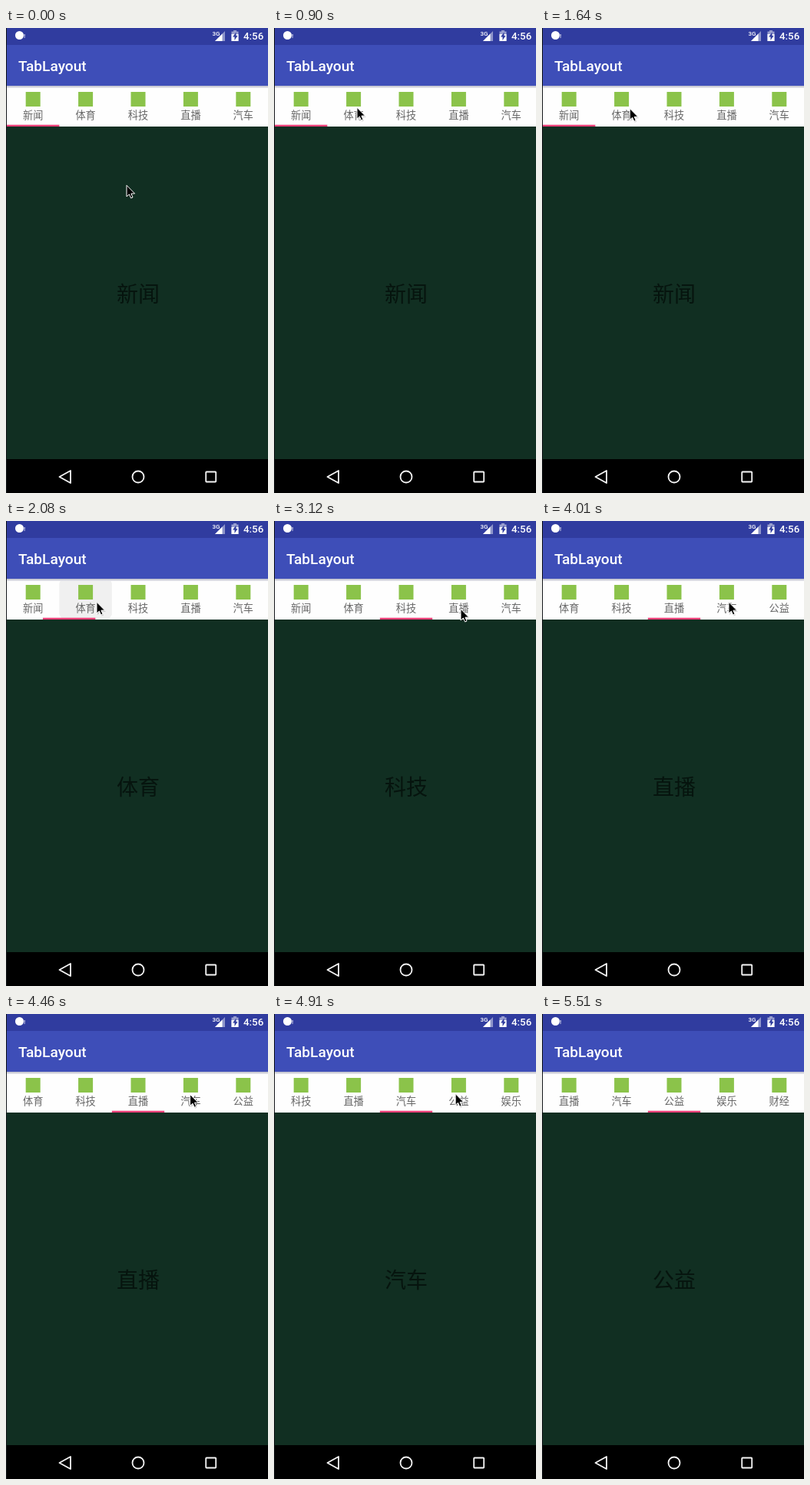
Animation of 341 by 604 pixels, one loop 6.26 s. Source, as an HTML page:

```html
<!DOCTYPE html>
<html lang="zh">
<head>
<meta charset="utf-8">
<style>
html, body { margin: 0; height: 100%; overflow: hidden; background: #000; }
svg { display: block; width: 100vw; height: 100vh; }
text { font-family: Roboto, sans-serif; font-weight: 500; fill: #fff; }
.cjk text { font-family: "Noto Sans CJK SC", "Noto Sans CJK", sans-serif; font-weight: 400; text-anchor: middle; }
#tabs text { font-size: 13.2px; fill: #666; }
#pages text { font-size: 28px; fill: #06140e; }
</style>
</head>
<body>
<svg viewBox="0 0 341 604">
  <defs>
    <linearGradient id="shade" x2="0" y2="1">
      <stop stop-color="#b8bac8"/><stop offset="1" stop-color="#ececef"/>
    </linearGradient>
    <clipPath id="cell"><rect x="-34.2" y="75" width="68.4" height="53"/></clipPath>
  </defs>

  <rect y="75" width="341" height="53" fill="#fefefe"/>
  <g id="tabs" class="cjk"></g>
  <rect id="bar" y="125.7" width="68.4" height="2.3" fill="#ee4079"/>

  <rect y="128" width="341" height="432" fill="#112f22"/>
  <g id="pages" class="cjk"></g>

  <rect width="341" height="22" fill="#303c9f"/>
  <rect y="22" width="341" height="53" fill="#3e4eb8"/>
  <rect y="75" width="341" height="3" fill="url(#shade)"/>
  <text x="16" y="56" font-size="19.1">TabLayout</text>

  <circle cx="17.5" cy="9.5" r="5.5" fill="#fff"/>
  <text x="23" y="13" font-size="8">!</text>
  <text x="268.5" y="10" font-size="8">3G</text>
  <path d="M285 4V17H272Z" fill="#fff" opacity=".45"/>
  <path d="M281.5 7.5V17H272Z" fill="#fff"/>
  <path d="M296 3h4v1.5h2.500V17h-9V4.500H296Z" fill="#fff" opacity=".5"/>
  <path d="M293.500 8h9v9h-9Z" fill="#fff"/>
  <path d="M299.500 5.500l-4.500 6h2.500V16l4-6h-2Z" fill="#303c9f"/>
  <text x="309" y="15" font-size="13.3">4:56</text>

  <rect y="560" width="341" height="44"/>
  <g fill="none" stroke="#f4f4f4" stroke-width="1.8" stroke-linejoin="round">
    <path d="M69.500 583L84 575V591Z"/>
    <circle cx="172" cy="583" r="7.500"/>
    <rect x="260.200" y="576.500" width="13" height="13" rx=".8"/>
  </g>
  <rect width="1" height="604" fill="#15181b"/>

  <g id="cursor">
    <path d="M1 2V17L4.500 14 6.500 18.500 9 17.500 7 13H12Z" opacity=".15"/>
    <path d="M0 .3V15L3.400 12 5.600 17 8 16 5.900 11.100H10.600Z" stroke="#fff"/>
  </g>
</svg>
<script>
const LOOP = 6260, STEP = 148.5, TAB = 68.4, WIDTH = 341;
const names = ['新闻', '体育', '科技', '直播', '汽车', '公益', '娱乐', '财经'];
const $ = id => document.getElementById(id);

// Times are counted in screen refreshes of STEP ms; each tap moves one tab on.
const taps = [13.68, 18.61, 24.5, 30.5, 34.31];
const cursorPath = [
  [0, 157, 204], [6, 108, 103], [14, 118, 105], [18, 164, 112],
  [21, 243, 114], [27, 243, 105], [34, 235, 103], [36.5, 248, 640]
];

const clamp = x => Math.min(1, Math.max(0, x));
const easeOut = u => 1 - (1 - clamp(u)) ** 3;
const move = (el, x, y = 0) => el.setAttribute('transform', `translate(${x} ${y})`);
const tabX = i => 1 + (i + .5) * TAB;

function cursorAt(n) {
  let [, x, y] = cursorPath[0];
  cursorPath.slice(1).forEach(([end, px, py], i) => {
    const start = cursorPath[i][0];
    const u = clamp((n - start) / (end - start));
    x += (px - x) * u;
    y += (py - y) * u;
  });
  return [x, y];
}

$('tabs').innerHTML = '<g id="ripple" clip-path="url(#cell)"><circle cy="101" r="40" fill="#f0f0f0"/></g>' +
  names.map((name, i) =>
    `<rect x="${tabX(i) - 9.5}" y="83" width="19" height="19" fill="#8bc34a"/>
    <text x="${tabX(i)}" y="118">${name}</text>`).join('');
$('pages').innerHTML = names.map((name, i) =>
  `<text x="${172 + i * WIDTH}" y="355.5">${name}</text>`).join('');

function draw(time) {
  const n = Math.floor(time % LOOP / STEP);
  const pos = taps.reduce((sum, tap) => sum + easeOut(n - tap), 0);
  const scroll = Math.max(0, pos - 2);
  const page = pos < 1 ? Math.ceil(pos) : pos; // the first switch is instant
  const pressed = taps.findIndex((tap, i) => i % 3 === 0 && n > tap && n < tap + 1);

  move($('tabs'), -scroll * TAB);
  move($('bar'), 1 + (pos - scroll) * TAB);
  move($('pages'), -page * WIDTH);
  move($('cursor'), ...cursorAt(n));
  move($('ripple'), tabX(pressed + 1));
  $('ripple').style.opacity = pressed < 0 ? 0 : 1;
}

const start = performance.now();
function tick() {
  draw(performance.now() - start);
  requestAnimationFrame(tick);
}
tick();
</script>
</body>
</html>
```
